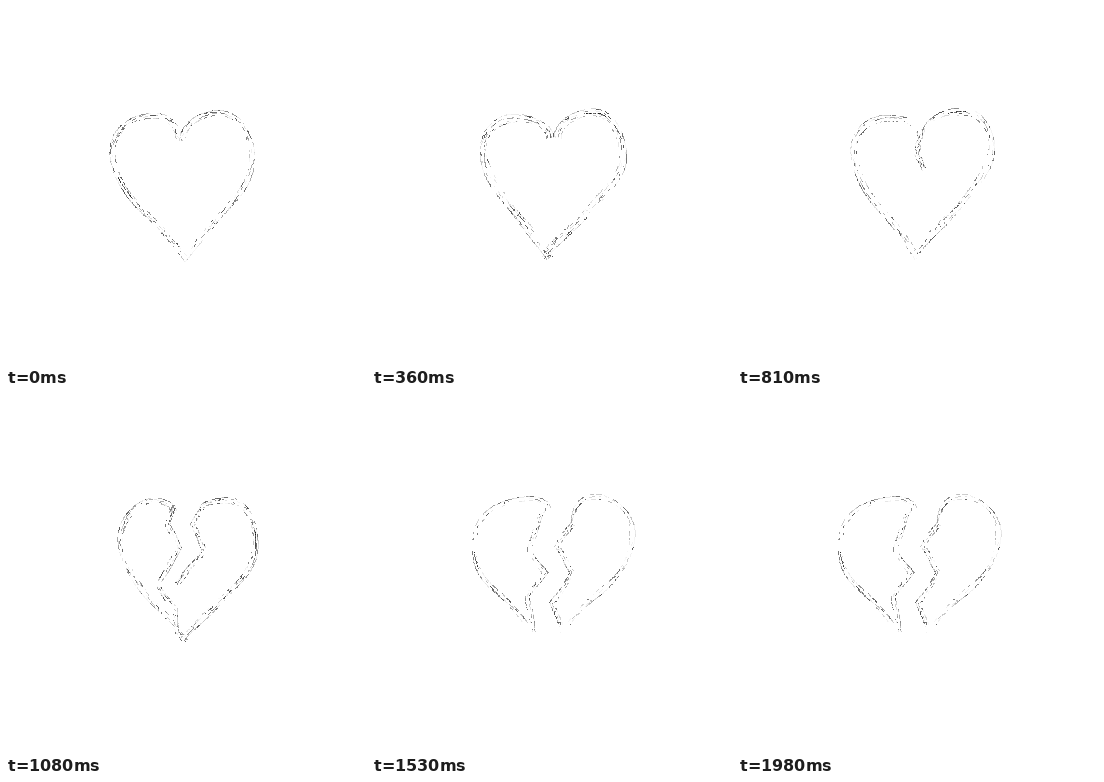
These frames come from a looping animation (360x360 px, 2.07 s). An HTML page with a canvas:

```html
<!DOCTYPE html>
<html lang="en">
<head>
<meta charset="utf-8">
<title>Breaking heart</title>
<style>
  html, body { margin: 0; width: 100%; height: 100%; overflow: hidden; background: #fff; }
  canvas { display: block; width: 360px; height: 360px; }
</style>
</head>
<body>
<canvas id="stage" width="360" height="360"></canvas>
<script>
const STEP = 90, COUNT = 23, SAMPLES = 260;
const ctx = document.getElementById('stage').getContext('2d');

// A rim is notch, peak, side, tip; a crack is a zigzag from top to bottom.
// dark: rim index and the stretch of it that is pressed harder.
const round = {
  width: 5, bulge: .35, dark: [0, .55, .66],
  rims: [[174,134, 148,106, 103,148, 179,255], [174,134, 210,104, 249,150, 179,255]],
  cracks: []
};
const tilted = {
  width: 7, bulge: .35, dark: [1, .17, .27],
  rims: [[181,131, 144,108, 107,143, 174,253], [181,131, 222,103, 254,148, 174,253]],
  cracks: []
};
const chipped = {
  width: 6, bulge: .35, dark: [1, .15, .23],
  rims: [[183,128, 150,108, 112,146, 177,253], [183,128, 226,102, 256,140, 177,253]],
  cracks: [[184,126, 180,147, 188,162]]
};
const cracked = {
  width: 5, bulge: .4, dark: [1, .36, .45],
  rims: [[170,118, 146,104, 112,146, 177,248], [193,113, 220,103, 252,148, 177,248]],
  cracks: [[170,112, 163,130, 176,154, 153,190, 170,214, 173,240], [193,113, 184,131, 196,155, 169,188]]
};
const parted = {
  width: 4, bulge: .5, dark: [0, .57, .74],
  rims: [[175,126, 145,104, 102,150, 165,245], [186,145, 225,101, 262,145, 188,235]],
  cracks: [[175,126, 161,155, 174,187, 159,211, 165,245], [186,145, 195,183, 181,210, 188,235]]
};
const spread = {
  width: 4, bulge: .5, dark: [0, .56, .65],
  rims: [[178,115, 155,102, 99,150, 153,231], [198,128, 223,100, 262,140, 198,230]],
  cracks: [[175,110, 158,155, 175,178, 157,202, 163,237], [198,128, 182,152, 198,178, 178,208, 188,238]]
};
const keys = [
  [0, round], [4, tilted], [5, round], [9, chipped], [12, cracked],
  [15, parted], [17, spread], [20, parted], [22, spread]
];

const lerp = (a, b, k) => a + (b - a) * k;
const mix = (p, q, k) => p.map((v, i) => lerp(v, q[i], k));
const pairs = flat => flat.flatMap((v, i) => i % 2 ? [] : [[v, flat[i + 1]]]);

function random(seed) {
  let s = seed * 7919 + 17;
  return () => {
    s = (s + 0x6D2B79F5) | 0;
    let r = Math.imul(s ^ s >>> 15, 1 | s);
    r ^= r + Math.imul(r ^ r >>> 7, 61 | r);
    return ((r ^ r >>> 14) >>> 0) / 4294967296;
  };
}

function bezier(a, b, c, d) {
  return Array.from({ length: 41 }, (_, i) => {
    const u = i / 40, v = 1 - u;
    return a.map((_, n) => v ** 3 * a[n] + 3 * v * v * u * b[n] + 3 * v * u * u * c[n] + u ** 3 * d[n]);
  });
}

// Two quarter ellipses over the lobe, then a sweep down to the tip.
function rim(flat, bulge) {
  const [notch, peak, side, tip] = pairs(flat), arc = .55;
  return [
    ...bezier(notch, mix(notch, [notch[0], peak[1]], arc), mix(peak, [notch[0], peak[1]], arc), peak),
    ...bezier(peak, mix(peak, [side[0], peak[1]], arc), mix(side, [side[0], peak[1]], arc), side),
    ...bezier(side, mix(side, [side[0], tip[1]], bulge), mix(tip, side, .33), tip)
  ];
}

function resample(line) {
  const len = [0];
  for (let i = 1; i < line.length; i++) {
    len.push(len[i - 1] + Math.hypot(line[i][0] - line[i - 1][0], line[i][1] - line[i - 1][1]));
  }
  let j = 1;
  return Array.from({ length: SAMPLES }, (_, i) => {
    const goal = len[len.length - 1] * i / (SAMPLES - 1);
    while (j < line.length - 1 && len[j] < goal) j++;
    return mix(line[j - 1], line[j], (goal - len[j - 1]) / (len[j] - len[j - 1] || 1));
  });
}

function dot(points, i, offset, side, shade) {
  const a = points[Math.max(0, i - 3)], b = points[Math.min(SAMPLES - 1, i + 3)];
  const dx = b[0] - a[0], dy = b[1] - a[1], d = Math.hypot(dx, dy) || 1;
  ctx.fillStyle = `rgb(${shade},${shade},${shade})`;
  ctx.fillRect(
    Math.round(points[i][0] + side * dy / d * offset),
    Math.round(points[i][1] - side * dx / d * offset), 1, 1);
}

// Several broken, wavering hairlines side by side.
function pencil(points, end, side, width, rnd) {
  const lines = Math.round(width / 2) + 1;
  for (let n = 0; n < lines; n++) {
    const phase = rnd() * 6;
    const cover = n ? .38 : .72;
    for (let i = 0; i < end;) {
      const stop = Math.min(end, i + 1 + Math.floor(rnd() * 5));
      const shade = Math.floor(250 - 170 * rnd() ** 1.6);
      const on = rnd() < cover * (1 + .35 * Math.sin(i / 17 + phase));
      const offset = width * n / (lines - 1) + .7 * Math.sin(i / 13 + phase);
      for (; i < stop; i++) if (on) dot(points, i, offset, side, shade);
    }
  }
}

function draw(frame) {
  const next = Math.max(1, keys.findIndex(key => key[0] >= frame));
  const [t0, from] = keys[next - 1], [t1, to] = keys[next];
  const k = (frame - t0) / (t1 - t0);
  const width = lerp(from.width, to.width, k);
  const rnd = random(frame < 15 ? frame : 15 + frame % 5);
  ctx.fillStyle = '#fff';
  ctx.fillRect(0, 0, 360, 360);

  for (const i of [0, 1]) {
    const side = i ? -1 : 1;
    const a = resample(rim(from.rims[i], from.bulge)), b = resample(rim(to.rims[i], to.bulge));
    const points = a.map((p, n) => mix(p, b[n], k));
    pencil(points, SAMPLES, side, width, rnd);

    const [darkRim, start, stop] = (k < .5 ? from : to).dark;
    for (let n = Math.floor(start * SAMPLES); darkRim === i && n < stop * SAMPLES; n++) {
      if (rnd() < .85) dot(points, n, width / 2, side, Math.floor(20 + rnd() * 110));
    }

    if (!to.cracks[i]) continue;
    const whole = !from.cracks[i];
    const c = resample(pairs(whole ? to.cracks[i] : from.cracks[i])), d = resample(pairs(to.cracks[i]));
    const grown = whole ? Math.max(0, 2 * k - 1) : 1;
    pencil(c.map((p, n) => mix(p, d[n], k)), Math.floor(SAMPLES * grown), -side, 4, rnd);
  }
}

const begin = performance.now();
let shown = -1;
function tick() {
  const frame = Math.floor((performance.now() - begin) / STEP) % COUNT;
  if (frame !== shown) draw(shown = frame);
  requestAnimationFrame(tick);
}
tick();
</script>
</body>
</html>
```
